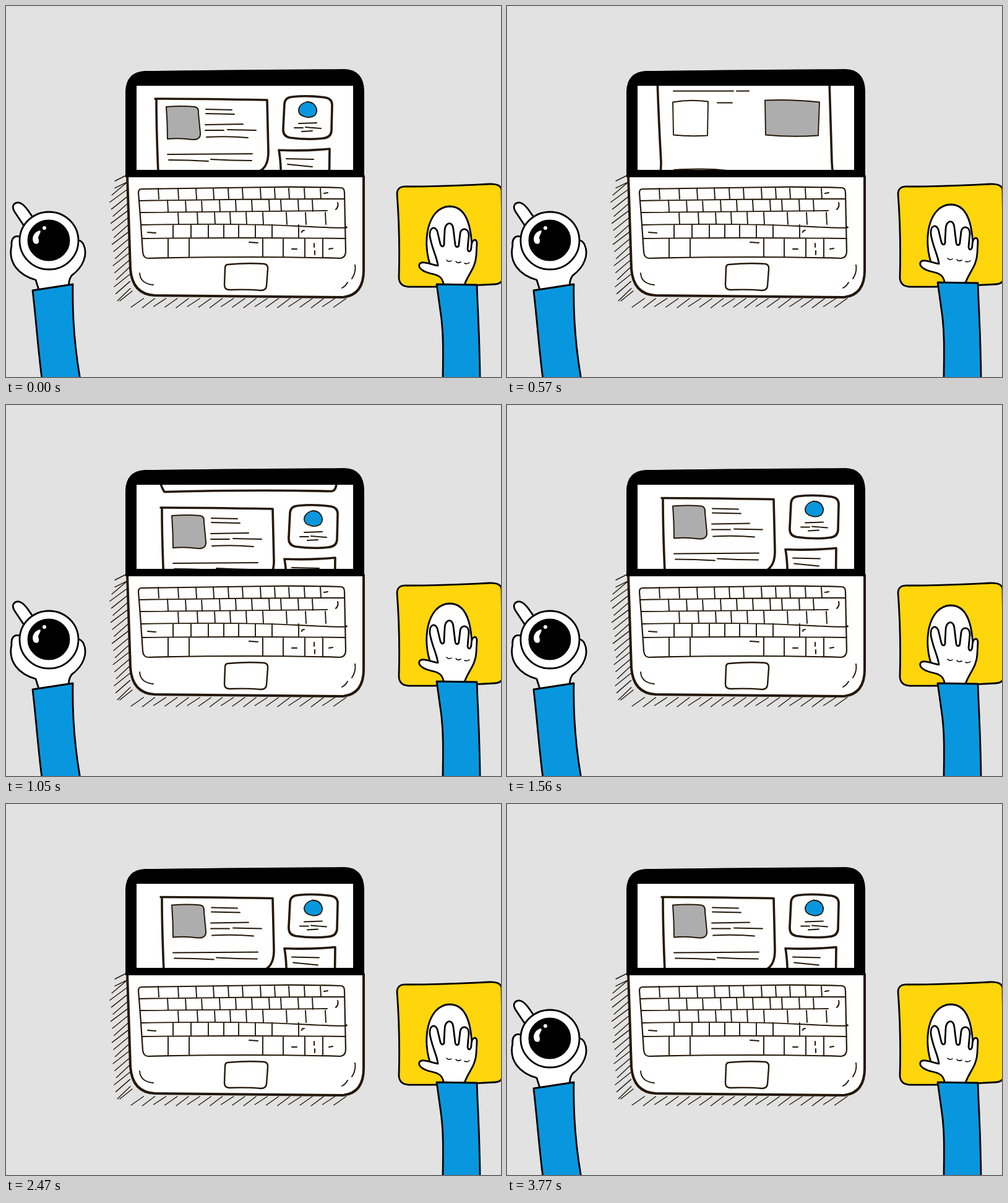
Animation of 800 by 600 pixels, one loop 4.77 s. Source, as an HTML page:

```html
<!DOCTYPE html>
<html>
<head>
<meta charset="utf-8">
<style>
html, body { margin: 0; width: 100%; height: 100%; overflow: hidden; background: #e2e2e2; }
svg { display: block; width: 800px; height: 600px; }
path, ellipse { stroke-linecap: round; stroke-linejoin: round; }
.ink { stroke: #241809; fill: none; }
.thin { stroke-width: 1.9; }
.card { stroke-width: 3.6; }
.limb { stroke: #000; stroke-width: 2.8; fill: #fff; }
.blue { fill: #0897de; }
.yellow { fill: #ffd50b; }
.grey { fill: #adadad; }
</style>
</head>
<body>
<svg viewBox="0 0 800 600">
  <defs>
    <clipPath id="view"><path d="M211 129H561V265H211Z"/></clipPath>
    <g id="page" class="ink">
      <g class="card">
        <path d="M241 150Q300 150 422 152L424 236Q424 260 410 267L246 269Q243 200 243 151"/>
        <path d="M462 147Q488 144 516 148Q528 150 527 162L526 202Q525 213 512 214Q488 217 459 213Q447 211 448 198L450 158Q451 148 462 147Z"/>
        <path d="M441 233Q480 235 523 231L522 317Q485 320 444 317Q446 260 441 233"/>
      </g>
      <path class="grey" stroke-width="2" d="M259 163Q285 161 305 163Q312 164 311 174L314 205Q315 217 301 216Q280 213 261 215Q261 190 259 163Z"/>
      <path class="blue" stroke-width="1.8" d="M486 155Q496 155 500 162Q505 170 499 177Q492 182 483 179Q472 176 473 167Q475 158 486 155Z"/>
      <path class="thin" d="M323 167L365 168M323 174L369 175M322 192L383 191M322 201H352M358 200L404 201M324 212Q360 210 391 213M261 240L398 239M263 249Q295 249 327 251M331 248Q365 250 397 250M473 190L502 189M466 197H480M484 196L509 198M478 203L495 202M453 247L497 248M455 256L495 260"/>
      <g transform="translate(0 186)">
        <path class="card" d="M243 152Q380 151 523 153Q521 180 522 200Q470 209 410 206Q330 200 241 204Q245 180 243 152Z"/>
        <path class="thin" d="M258 167H315M260 174L292 176M356 168Q385 169 411 171M356 177L384 176M442 173L488 171M442 183L471 182"/>
        <path class="card" d="M241 228Q260 225 340 228Q440 233 521 230Q523 300 525 361C528 407 535 447 534 484Q533 496 525 496Q400 493 256 497C237 468 248 410 249 361Q245 290 243 227"/>
        <path class="thin" d="M269 246H366M371 246H391"/>
        <path class="thin" d="M268 264Q295 259 325 263L324 318Q295 320 269 317Z"/>
        <path class="thin grey" d="M417 261Q460 259 505 264L503 318Q460 321 418 317Z"/>
        <path class="thin" d="M340 265H364"/>
      </g>
      <g transform="translate(0 418.5)">
        <path class="thin" d="M270 141Q315 138 345 141T383 142M270 150L331 152M341 152L424 151M271 181H317M321 181H417M434 181L472 183M485 184H517M271 190H323M340 191Q420 195 477 194M287 244L310 243M277 250Q300 248 324 250M380 242L397 240M368 249H407M463 243H477M455 252L492 251"/>
        <g class="yellow" stroke-width="1.8">
          <path d="M290 206Q302 200 312 207Q320 216 317 225Q309 234 296 233Q283 230 282 221Q283 211 290 206Z"/>
          <path d="M374 209Q386 206 396 212Q402 220 400 227Q394 235 382 234Q370 229 368 222Q368 214 374 209Z"/>
          <path d="M456 210Q468 207 477 213Q483 219 480 227Q473 234 462 234Q450 230 449 222Q449 214 456 210Z"/>
        </g>
      </g>
    </g>
  </defs>

  <path id="hatch" class="ink" stroke-width="1.4"/>
  <path class="ink" stroke-width="4" style="fill:#fff" d="M196 275L201 425Q204 466 240 468Q400 470 545 471Q579 467 578 425L578 275Z"/>
  <path d="M193 277V138Q194 107 224 105Q400 103 547 102Q578 103 579 137V277Z"/>
  <path fill="#fff" d="M211 129H561V265H211Z"/>
  <g clip-path="url(#view)">
    <g id="scroll">
      <use href="#page"/>
      <use href="#page" x="9" y="558.5"/>
    </g>
  </g>

  <path class="ink" stroke-width="2.2" d="M219 296Q380 294 425 293T541 294Q547 294 547 302L549 397Q549 407 540 408Q400 404 230 408Q222 408 221 398Q218 350 214 302Q214 296 219 296Z"/>
  <path id="keys" class="ink thin"/>
  <path class="ink" stroke-width="2" d="M514 303L520 302M536 318Q538 324 533 329M229 366L242 367M478 366Q478 363 482 363M393 382L407 383M462 393H470M498 384V390M499 396V402M522 393L528 392"/>
  <path class="ink" stroke-width="2.4" d="M359 418Q390 415 417 417Q424 418 423 426L421 453Q420 460 412 460Q390 458 361 459Q353 459 353 451L354 424Q354 418 359 418Z"/>
  <path class="ink thin" d="M216 432Q217 449 238 451M564 419Q566 430 559 441M552 447Q549 453 543 456"/>

  <path class="yellow" stroke="#000" stroke-width="2.8" d="M632 304Q632 291 648 292Q710 292 780 288Q802 287 801 300L803 438Q803 449 790 450Q700 455 650 454Q636 453 635 440Q637 370 632 304Z"/>
  <g id="mouse" class="limb">
    <path d="M688 425C671 385 680 325 717 324C750 324 754 370 754 420Z"/>
    <path d="M708 454C706 440 702 436 688 433C674 430 666 424 668 418C671 411 684 417 698 420C697 407 688 392 685 372C684 358 693 355 697 364L702 385C704 391 709 390 708 382L709 364C709 349 722 347 723 361L726 386C727 391 732 391 732 385L734 368C735 358 748 358 748 371L746 393C747 399 751 398 752 391C752 376 761 375 761 384L760 403C759 425 745 435 740 454Z"/>
    <path style="fill:none;stroke-width:1.5" d="M712 411Q716 415 720 412M727 413Q730 417 735 414M741 416Q745 418 749 415"/>
    <path class="blue" d="M696 450L761 451C763 510 767 560 766 640H706C705 590 709 545 703 500Z"/>
  </g>

  <g id="cup" class="limb">
    <path d="M22 373C12 370 8 378 9 388C3 415 20 435 48 443L54 462L102 455Q100 445 106 436C125 422 133 402 125 385Q121 378 114 379Z"/>
    <path d="M28 354L14 333C7 322 15 317 21 318C30 320 38 334 46 346Z"/>
    <ellipse cx="69.500" cy="379.500" rx="47.500" ry="46.500"/>
    <ellipse cx="69" cy="379" rx="33" ry="32" style="fill:#000"/>
    <g stroke="none">
      <path d="M55 363C44 365 40 378 46 384C54 387 54 380 52 375C52 371 58 365 55 363Z"/>
      <ellipse cx="62" cy="359" rx="3" ry="3"/>
    </g>
    <path class="blue" d="M43 460L108 450C107 500 111 555 121 610H59C52 560 49 510 43 460Z"/>
  </g>
</svg>
<script>
const LOOP = 4770, STEP = 30;
const el = id => document.getElementById(id);

// keyboard: [top, bottom, slant, divider positions]
const rows = [
  [295, 312, 1, [246, 278, 307, 335, 359, 382, 411, 434, 457, 482, 508]],
  [314, 332, 1, [261, 290, 316, 345, 371, 397, 425, 444, 472, 495]],
  [334, 353, 1, [278, 309, 337, 362, 388, 415, 453, 484, 516]],
  [354, 375, 0, [270, 299, 327, 352, 376, 403, 430, 473]],
  [376, 406, 0, [262, 296, 415, 448, 483, 512]]
];
let keys = "M215 315Q380 312 547 312M217 334Q380 333 519 331M218 354Q380 351 472 356T549 357M220 376Q380 374 549 376";
for (const [top, bottom, slant, xs] of rows)
  for (const x of xs) keys += `M${x} ${top}L${x + slant} ${bottom}`;
el("keys").setAttribute("d", keys);

// pencil shading on the left and below the laptop
let hatch = "";
for (let i = 0; i < 18; i++) {
  const y = 283 + i * 11.4, x = i < 2 ? 176 : 166 + i * .6 + i % 3 * 2;
  hatch += `M${x} ${y}L${Math.min(194 + i * .4, x + 28)} ${y - (i < 2 ? 9 : 20)}`;
}
for (let i = 0; i < 20; i++) {
  const x = 184 + i * 18.2;
  hatch += `M${x} ${i ? 486 + i % 3 : 477}L${x + 20} ${i ? 473 : 461}`;
}
el("hatch").setAttribute("d", hatch);

// whole steps done since a start time, at most n
const steps = (t, start, n) => Math.max(0, Math.min(n, Math.floor((t - start) / STEP + 1e-6)));
// out and back over n steps, peaking at 1
const bump = (k, n) => 1 - Math.abs(1 - 2 * k / n);
const move = (id, x, y) => el(id).setAttribute("transform", `translate(${x} ${y})`);

function draw(now) {
  const t = now % LOOP;
  const scroll = steps(t, 0, 36);
  move("scroll", 0, -15.5 * scroll);
  const x = 7 * bump(steps(t, 1590, 7), 7) - 13 * bump(steps(t, 1380, 6), 6);
  move("mouse", x, -9 * bump(scroll % 6, 6));
  move("cup", 0, 30 * (steps(t, 2170, 10) - steps(t, 3470, 10)));
}

let start;
function frame(now) {
  start ??= now;
  draw(now - start);
  requestAnimationFrame(frame);
}
draw(0);
requestAnimationFrame(frame);
</script>
</body>
</html>
```
